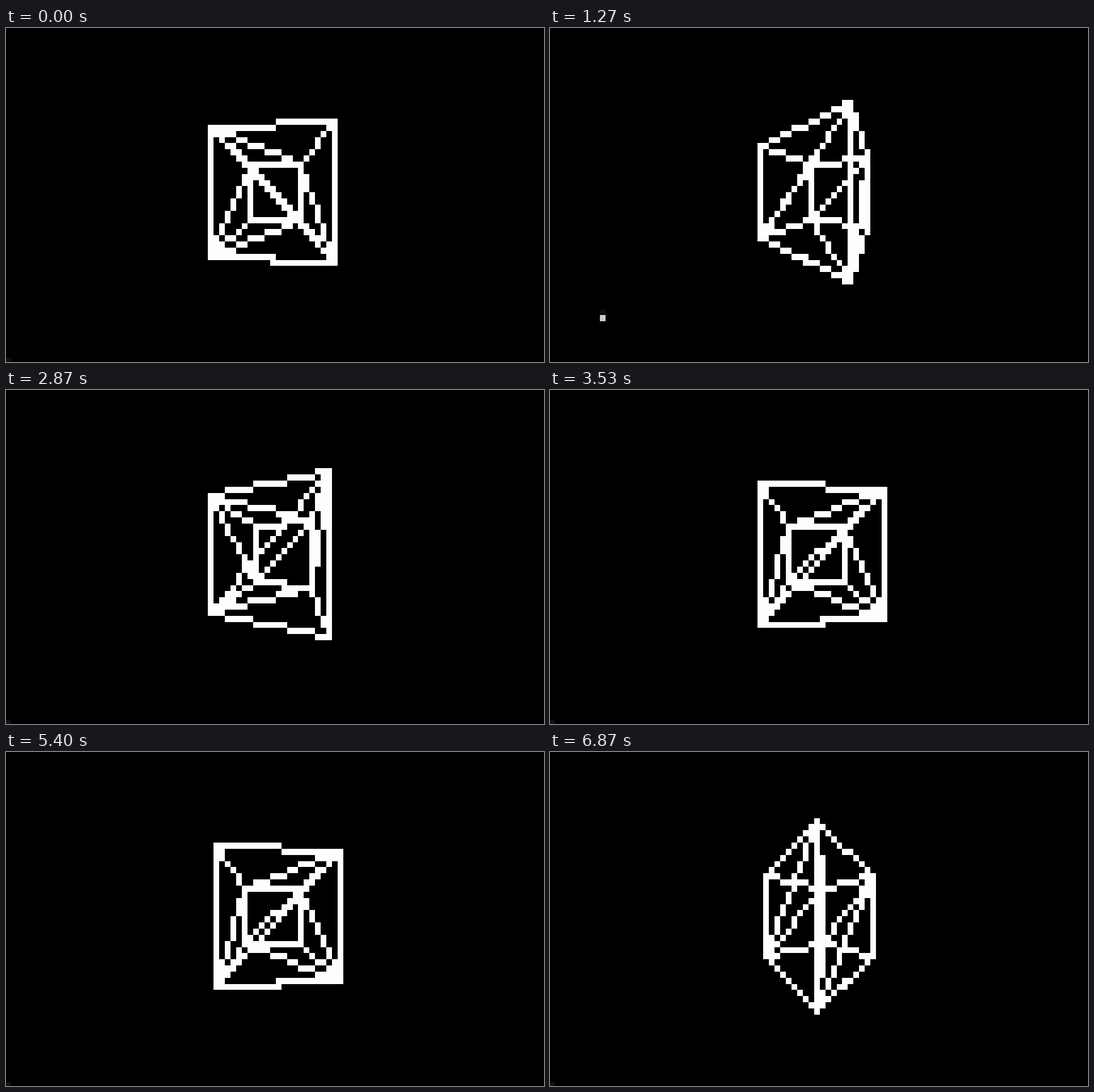
These frames come from a looping animation (949 by 590 pixels, 6.94 s). An HTML page with a canvas:

```html
<!DOCTYPE html>
<html lang="en">
<head>
<meta charset="utf-8">
<title>Terminal cube</title>
<style>
  html, body { margin: 0; width: 100%; height: 100%; overflow: hidden; background: #000; }
  canvas { display: block; }
</style>
</head>
<body>
<canvas id="stage" width="949" height="590"></canvas>
<script>
const ctx = document.getElementById('stage').getContext('2d');

const LOOP = 6940, STEP = 1000 / 15, LAST = 103;
const FOCAL = 16.6, DIST = 2.5;

// [step, heading of the first corner in degrees]
const TURN = [[0, 223.5], [19, 464], [31, 589], [43, 749.5], [63, 991], [81, 1219], [103, 1529]];

// Cursor flashes: step -> [column, row, top of the trail, trail shade]
const FLASH = {
  19: [9, 47, 497, '#0e0e0e'],
  38: [84, 10, 101, '#141414'],
  63: [39, 9, 84, '#1a1a1a']
};

const cellX = c => Math.round(9.94 * c - 1.4);
const cellY = r => Math.round(10.85 * r - 2.7);

function cell(c, r) {
  const x = cellX(c), y = cellY(r);
  ctx.fillRect(x, y, cellX(c + 1) - x, cellY(r + 1) - y);
}

// Bresenham line; ties stay with the starting side
function line([x0, y0], [x1, y1]) {
  const dx = x1 - x0, dy = y1 - y0;
  const n = Math.max(Math.abs(dx), Math.abs(dy));
  const part = (d, i) => Math.sign(d) * Math.ceil(Math.abs(d) * i / n - 0.5);
  if (!n) return cell(x0, y0);
  for (let i = 0; i <= n; i++) cell(x0 + part(dx, i), y0 + part(dy, i));
}

function heading(step) {
  let k = 1;
  while (TURN[k][0] < step) k++;
  const [s0, a0] = TURN[k - 1], [s1, a1] = TURN[k];
  return a0 + (a1 - a0) * (step - s0) / (s1 - s0);
}

// Top and bottom end of an upright edge of the cube
function post(deg) {
  const a = deg * Math.PI / 180;
  const scale = FOCAL / (DIST - Math.SQRT2 * Math.cos(a));
  const x = Math.floor(48 + Math.SQRT2 * Math.sin(a) * scale);
  return { top: [x, Math.floor(27 - scale)], low: [x, Math.floor(27 + scale)] };
}

function cube(deg) {
  const [a, p, c, q] = [0, 90, 180, 270].map(d => post(deg + d));
  for (const v of [a, p, c, q]) line(v.top, v.low);
  for (const [u, v] of [[p, a], [a, q], [p, c], [c, q]]) {
    line(u.top, v.top);
    line(u.low, v.low);
    if (v !== a) line(v.low, u.low);
  }
  // face diagonals
  line(p.top, q.top);
  line(p.low, q.low);
  line(a.top, p.low);
  line(a.top, q.low);
  line(p.top, c.low);
  line(q.top, c.low);
}

function cursor(step) {
  const flash = FLASH[step];
  if (!flash) {
    ctx.fillStyle = '#111';
    return cell(0, 54);
  }
  const [c, r, top, shade] = flash;
  ctx.fillStyle = shade;
  ctx.fillRect(cellX(c), top, cellX(c + 1) - cellX(c), cellY(r) - top);
  ctx.fillStyle = '#ccc';
  cell(c, r);
}

const start = performance.now();
let shown = -1;

function draw() {
  const t = (performance.now() - start) % LOOP;
  const step = Math.min(LAST, Math.floor((t + 1) / STEP));
  if (step !== shown) {
    shown = step;
    ctx.fillStyle = '#000';
    ctx.fillRect(0, 0, 949, 590);
    cursor(step);
    ctx.fillStyle = '#fdfdfd';
    cube(heading(step));
  }
  requestAnimationFrame(draw);
}
draw();
</script>
</body>
</html>
```
